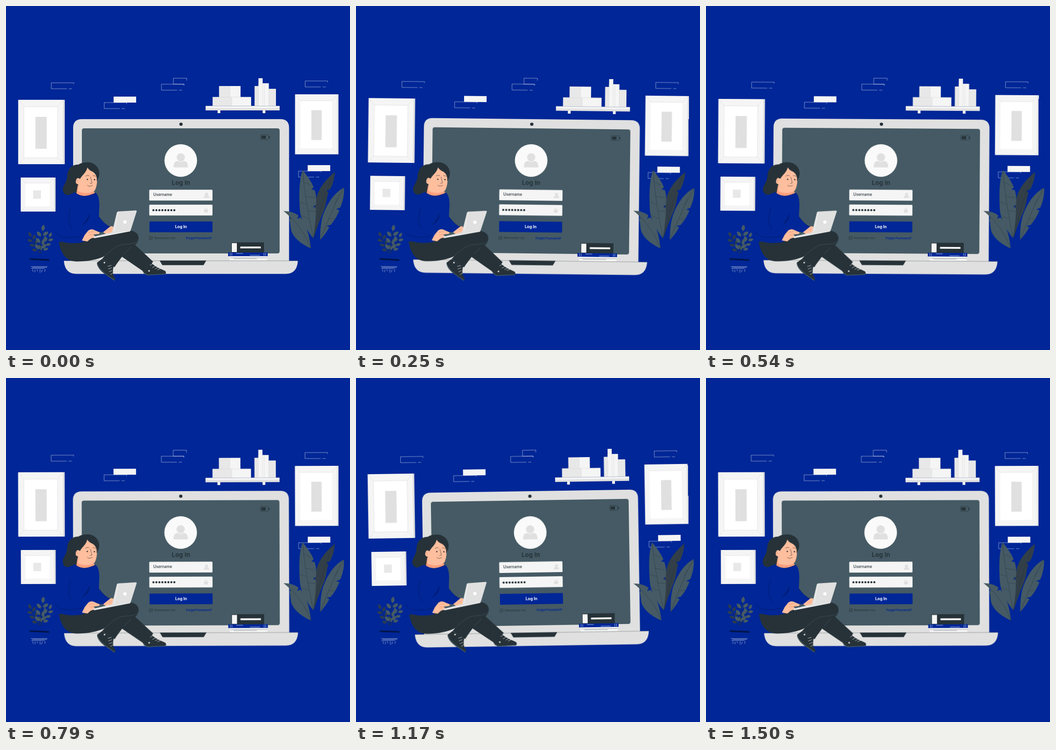
Recreate the animation shown at these times as an HTML page without scripts. Size 748 by 748 pixels, loop 1540 ms.

```html
<!DOCTYPE html>
<html lang="en">
<head>
<meta charset="utf-8">
<title>Log in</title>
<style>
  html, body { margin: 0; width: 100%; height: 100%; overflow: hidden; background: #002697; }
  svg { display: block; width: 100vw; height: 100vh; font-family: Inter, "Open Sans", sans-serif; }
  .sway { animation: sway 1540ms linear infinite; }
  .wall { transform-origin: 374px 290px; }
  .laptop { transform-origin: 380px 414px; }
  .woman { transform-origin: 206px 468px; }
  .palm { transform-origin: 669px 442px; }
  .fern { transform-origin: 74px 528px; }
  @keyframes sway {
    0%, 100% { transform: rotate(0deg); }
    7.8% { transform: rotate(.36deg); }
    16.2% { transform: rotate(.64deg); }
    21.4% { transform: rotate(.69deg); }
    28% { transform: rotate(.58deg); }
    35.1% { transform: rotate(.34deg); }
    51.3% { transform: rotate(-.17deg); }
    58.4% { transform: rotate(-.49deg); }
    64.9% { transform: rotate(-.77deg); }
    70.8% { transform: rotate(-.89deg); }
    76% { transform: rotate(-.87deg); }
    86.4% { transform: rotate(-.57deg); }
    97.4% { transform: rotate(-.17deg); }
  }
  .dark { fill: #263238; }
  .slate { fill: #455a64; }
  .blue { fill: #002697; }
  .skin { fill: #ffbe9d; }
  .pale { fill: #f5f5f5; }
  .white { fill: #fff; }
  .gray { fill: #e0e0e0; }
  .ink { fill: none; stroke: #263238; stroke-width: .7; stroke-linecap: round; }
  .mist { fill: none; stroke: #d5d5d5; stroke-width: .6; }
  .chalk { fill: none; stroke: #fff; stroke-width: .7; }
  .fold { fill: none; stroke: #001a6e; stroke-width: .9; }
  .bold { font-weight: 700; }
</style>
</head>
<body>
<svg viewBox="0 0 748 748">
  <defs>
    <path id="brick" class="chalk" opacity=".75" d="M34 13H0V0H49V3M38 13H45"/>
    <rect id="tile" class="pale" width="49" height="13"/>
    <g id="user">
      <circle r="9" cy="-7"/>
      <path d="M-15.5 15V12C-15.5 4-11 1-6 1Q0 5 6 1C11 1 15.5 4 15.5 12V15Z"/>
    </g>
    <path id="leaf" d="M0 0C-5-4-5-9 0-14C5-9 5-4 0 0Z"/>
    <g id="pair">
      <use href="#leaf" transform="translate(-2 0) rotate(-48)"/>
      <use href="#leaf" transform="translate(2 -3) rotate(48)"/>
    </g>
    <g id="twig">
      <path d="M0 0V-49" fill="none" stroke="#263238"/>
      <use href="#leaf" y="-49"/>
      <use href="#pair" y="-37"/>
      <use href="#pair" y="-23"/>
      <use href="#pair" y="-9"/>
    </g>
  </defs>

  <g class="sway wall">
    <use href="#brick" x="98.5" y="167"/>
    <use href="#brick" x="213.5" y="210"/>
    <use href="#tile" x="234" y="197"/>
    <use href="#brick" x="338" y="170"/>
    <path class="chalk" opacity=".75" d="M364 170V157H393V162M364 170H387V172"/>
    <use href="#brick" x="650.5" y="163"/>
    <use href="#brick" x="636" y="359"/>
    <use href="#tile" x="656" y="346"/>

    <!-- pictures -->
    <g>
      <path class="pale" d="M26.5 204H127.5V344H26.5Z"/>
      <path class="gray" d="M124 204H127.5V343H124Z"/>
      <path class="white" d="M39 219H112V330H39Z"/>
      <path class="mist" d="M27 204L39 219H112L124 205M27 343L39 330M112 330L124 343M39 219V330H112V219"/>
      <path class="gray" d="M64 241H88.5V310.5H64Z"/>
    </g>
    <g>
      <path class="pale" d="M32 373H107.5V447H32Z"/>
      <path class="gray" d="M104.5 373H107.5V446H104.5Z"/>
      <path class="white" d="M42 385H95V435.5H42Z"/>
      <path class="mist" d="M32 373L42 385H95L104 374M32 446L42 435.5M95 435.5L104 446"/>
      <path fill="#e8e8e8" d="M59 401H76V419H59Z"/>
    </g>
    <g>
      <path class="pale" d="M628.5 192H723V322.5H628.5Z"/>
      <path class="gray" d="M720 192H723V322H720Z"/>
      <path class="white" d="M640 206H709V309.5H640Z"/>
      <path class="mist" d="M629 192L640 206H709L720 193M629 322L640 309.5M709 309.5L720 322"/>
      <path class="gray" d="M664 226.5H686.5V291.5H664Z"/>
    </g>

    <!-- shelf -->
    <path class="pale" d="M434 217.5H595V227H434Z"/>
    <path class="gray" d="M434 222H595V227H434Z"/>
    <path class="pale" d="M460 227H466V233H460ZM558 227H564V233H558ZM463.5 174H510V198H463.5ZM449.5 198H533V217H449.5ZM549 157H558V217H549ZM558 168H571.5V217H558ZM571.5 180H587V217H571.5Z"/>
    <path fill="#e8e8e8" d="M463.5 174H487V198H463.5ZM449.5 198H491V217H449.5ZM540.5 174H549V217H540.5ZM571.5 180H587V217H571.5Z"/>
    <path class="mist" d="M487 174V198M491 198V217M449.5 198H533M549 168V217M558 168V217M571.5 180V217M562 170V217M434 217.5H595"/>
  </g>

  <g class="sway laptop">
    <path class="gray" d="M146 556V265Q146 246 165 246H597Q615.5 246 615.5 265V556Z"/>
    <rect class="slate" x="165" y="266" width="430" height="272" rx="4.5"/>
    <circle class="dark" cx="380.5" cy="257" r="3.6"/>
    <path class="gray" d="M126 554H634.5V556Q632 582.5 608 582.5H153Q129 582.5 126 556Z"/>
    <path class="ink" d="M126 554H634.5" opacity=".6"/>
    <path class="dark" d="M334 553.5H435.5L429.5 563.5H340Z"/>
    <rect class="ink" x="553.5" y="280" width="17.5" height="10.5" rx="2"/>
    <path class="dark" d="M555.5 282H565V288.5H555.5ZM571.5 283H573.5V287.5H571.5Z"/>

    <!-- login form -->
    <circle cx="380" cy="336" r="35.5" fill="#fafafa"/>
    <use href="#user" class="gray" x="380" y="336"/>
    <text class="dark bold" x="380.7" y="388.5" font-size="13" letter-spacing=".3" text-anchor="middle">Log In</text>
    <rect class="pale" x="311.5" y="399.5" width="137.5" height="23.5" rx="1.5"/>
    <rect class="pale" x="311.5" y="432" width="137.5" height="23.5" rx="1.5"/>
    <text class="dark" x="320.3" y="413.3" font-size="8.3" font-weight="500">Username</text>
    <use href="#user" class="gray" transform="translate(436 411.5) scale(.36)"/>
    <path d="M320.5 444H367" fill="none" stroke="#263238" stroke-width="4.6" stroke-linecap="round" stroke-dasharray="0 6.5"/>
    <rect class="gray" x="430.5" y="442.5" width="8.5" height="6.5" rx="1"/>
    <path d="M432.5 443V441.5A2.3 2.6 0 0 1 437 441.5V443" fill="none" stroke="#e0e0e0" stroke-width="1.2"/>
    <rect class="blue" x="312" y="468.5" width="137" height="23.5" rx="1"/>
    <text class="white bold" x="380.5" y="483.3" font-size="8.7" text-anchor="middle">Log In</text>
    <path class="ink" d="M312 501.5H318V508H312ZM313.5 504.5L315 506.5L318 502.5"/>
    <text class="dark" x="322" y="507.3" font-size="6.7">Remember me</text>
    <text class="blue bold" x="391.5" y="507.3" font-size="6.4">Forgot Password?</text>

    <!-- stacked books -->
    <path class="dark" d="M490 514H561V536H490Z"/>
    <path class="pale" d="M491 515.5H502V535H491ZM509.5 523H554V527H509.5Z"/>
    <path class="blue" d="M483 536H569V544H483Z"/>
    <path class="chalk" d="M487.5 537V543M491 537V543M561 537V543M564.5 537V543M500 538H515M530 542H552"/>
    <path class="pale" d="M486.5 544H567.5V553H486.5Z"/>
    <path class="ink" d="M488 547.5H567M495 549.5H545" stroke-width=".4" opacity=".6"/>
  </g>

  <g class="sway palm">
    <path fill="#323f48" d="M669 505C669 475 670 445 674 423C678 396 697 376 715 361C714 376 710 389 705 398L697 402L701 406C696 421 697 433 690 448C683 464 675 484 669 505Z"/>
    <path class="slate" d="M668 505C655 488 641 468 639 443C637 411 637 380 645 357C655 369 664 382 669 394L664 399L671 400C675 411 675 422 674 432L668 436L674 440C674 463 671 486 668 505Z"/>
    <path class="slate" d="M683 509C683 486 685 463 692 448C702 423 717 404 735 395C736 411 732 426 727 438L718 442L725 444C720 457 713 468 706 476L697 478L703 481C697 492 690 501 683 509Z"/>
    <path class="slate" d="M663 527C646 520 629 508 622 493C617 483 620 472 615 462L619 464L617 458C613 453 608 449 604 446C616 446 628 449 636 456L633 463L640 460C654 475 660 502 663 527Z"/>
    <path class="ink" d="M645 357C649 410 659 460 668 505M715 361C694 400 681 455 669 505M735 395C713 432 698 472 683 509M604 446C630 466 650 494 663 527" opacity=".75"/>
    <path class="ink" d="M648 383L662 390M651 414L671 417M656 445L673 447M639 427L653 431M642 456L658 462M713 432L721 418M701 463L714 462" stroke-width=".4" opacity=".6"/>
  </g>

  <g class="sway fern">
    <use href="#twig" fill="#2b3c4c" transform="translate(72 538) rotate(-26) scale(.82)"/>
    <use href="#twig" class="slate" transform="translate(75 538) rotate(28) scale(.82)"/>
    <use href="#twig" class="slate" transform="translate(73 538) rotate(8)"/>
    <path d="M51 548.5L94 550.5V554L52 552Z" fill="#001447"/>
    <path class="chalk" opacity=".75" d="M54 566.5H90M57 568.5H89M55 570.5H84M58 572L59 578M63 573V579M67 572L69 577M74 572V580M79 573L77 579M85 572L84 578"/>
  </g>

  <g class="sway woman">
    <!-- far leg and shoe -->
    <path class="dark" d="M222 521L276 515L320 556L300 578L246 541Z"/>
    <path class="dark" d="M316 558C323 567 338 572 346 576Q349 579 347 583L306 585L297 577Z"/>
    <path d="M299 580L307 585L347 583" fill="none" stroke="#455a64" stroke-width="1.5"/>
    <path class="chalk" d="M313 564L320 560M318 569L325 565M324 572L331 568M329 574L336 571" stroke-width="1.1"/>
    <circle cx="311" cy="576" r="1.8" fill="#ddd"/>

    <!-- near leg and shoe -->
    <path class="dark" d="M209 550L198 558C197 568 209 579 219 586L236 597L238 592C231 584 232 574 234 566Z"/>
    <path d="M198.500 560C199 569 214 582 236 596.500" fill="none" stroke="#455a64" stroke-width="1.5"/>
    <path class="chalk" d="M221 566L229 564M222 572L230 569M224 578L231 575M227 584L233 580" stroke-width="1.1"/>
    <circle cx="214" cy="558" r="1.8" fill="#ddd"/>
    <path class="dark" d="M115 513L166 511L190 503L265 488C281 487 290 497 288 507C286 522 266 527 256 540C249 550 242 558 236 568L209 550L214 544C198 552 174 556 152 555.500C128 554 119 536 115 513Z"/>
    <path d="M214 544C226 533 238 523 250 519C267 517 279 518 286 511M256 540L272 524" fill="none" stroke="#455a64" stroke-width=".7"/>

    <!-- hair behind -->
    <path class="dark" d="M162 345C143 343 134 354 133 371C132 386 121 392 124 403Q127 412 136 411C144 410 148 406 153 408L164 400V346Z"/>

    <!-- head -->
    <path fill="#ff9f7e" d="M156 390L153 408Q172 420 194 409L190 400Z"/>
    <path class="skin" d="M158 374C149 372 148 386 157 388L156 402C167 409 186 408 193 401C199 391 199 374 197 360L176 350Z"/>
    <path class="dark" d="M147 362C150 347 160 340 176 340C191 339 203 350 203 364C203 371 200 377 197 381C199 372 195 364 188 360C181 357 179 354 177 351C175 362 166 367 161 376L157 374C153 374 151 380 152 386Q145 374 147 362Z"/>
    <circle class="dark" cx="177" cy="377" r="1.5"/>
    <circle class="dark" cx="192.500" cy="377.500" r="1.5"/>
    <path class="ink" d="M173 370Q177 367 181 369M189 369Q193 368 196 371M184 372L187 385L183 386M177 390Q181 394 188 390" stroke-width="1.1"/>
    <path d="M154 377Q156 379 155 383" fill="none" stroke="#e58767" stroke-width=".8"/>

    <!-- sweater -->
    <path class="blue" d="M150 405C164 417 178 414 195 406C201 411 203 421 203 433L202 458C210 469 218 477 228 481L217 493L187 489L190 500L166 514C145 517 117 518 108 500C103 483 114 449 121 426Q130 411 150 405Z"/>
    <path class="fold" d="M152 407C166 417 178 414 195 407M140 438C137 457 132 472 145 487M108 490C111 505 137 506 165 500M202 458C210 469 218 477 228 481"/>
    <path fill="#001a6e" d="M182 451C181 465 175 472 164 477Q176 468 182 451Z"/>

    <!-- hands and small laptop -->
    <path class="skin" d="M211 492L226 480Q231 477 234 481L232 493L218 496Z"/>
    <path class="gray" d="M241 449Q242 447 244 446.800L282 444.500Q285 444.500 284 447L271 488L230 495Z"/>
    <path d="M244 447L234 494" fill="none" stroke="#f5f5f5"/>
    <circle class="white" cx="258.5" cy="469.5" r="3.6"/>
    <path class="skin" d="M165 510L171 498L179 488Q186 483 194 488L203 492Q205 496 199 496L190 497L195 502L184 506L177 512Z"/>
    <path class="gray" d="M189 502L230 492L271 487L270 490L192 505Z"/>
    <path d="M190 503.5L270 489" fill="none" stroke="#fafafa" stroke-width=".8"/>
    <path d="M180 493L191 490M181 498L190 497M224 488L229 485" fill="none" stroke="#e58767" stroke-width=".7"/>
  </g>
</svg>
</body>
</html>
```
